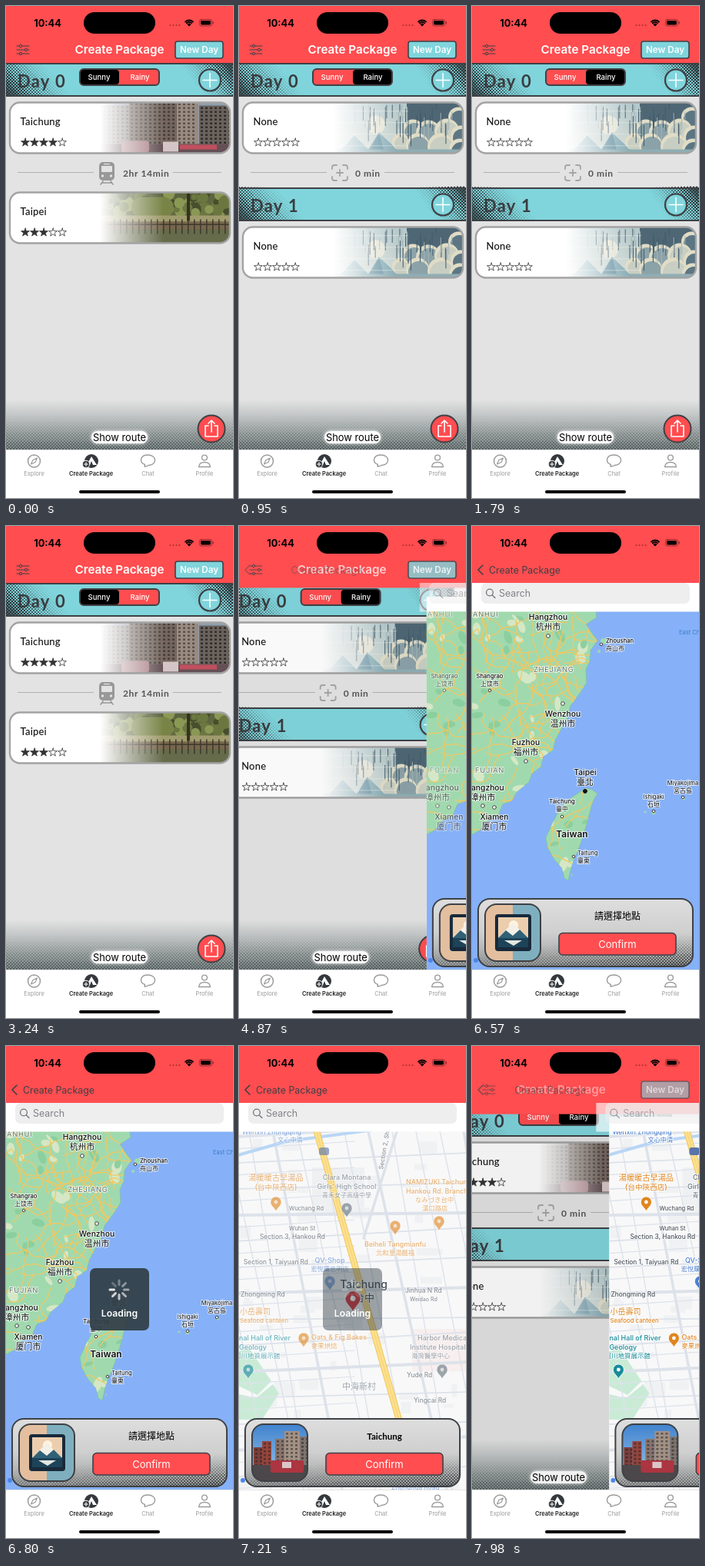
An HTML page with a canvas that plays this animation: 295 by 640 pixels, repeating every 8 s.

```html
<!DOCTYPE html>
<html lang="en">
<head>
<meta charset="utf-8">
<title>Trip planner</title>
<style>
html, body { margin: 0; width: 100%; height: 100%; overflow: hidden; background: #fff; }
canvas { display: block; width: 295px; height: 640px; }
</style>
</head>
<body>
<canvas id="stage"></canvas>
<script>
const W = 295, H = 640, LOOP = 8000;
const RED = '#ff4d50', CYAN = '#80d5dc', INK = '#3e4145', GRAY = '#9b9b9b';
const UI = 'Inter, "Noto Sans CJK TC", "Noto Sans CJK SC", sans-serif';
const HAND = 'Lato, sans-serif';
const canvas = document.getElementById('stage'), ctx = canvas.getContext('2d');
const dpr = window.devicePixelRatio || 1;
canvas.width = W * dpr;
canvas.height = H * dpr;

const clamp = v => Math.max(0, Math.min(1, v));
const ramp = (t, from, to) => clamp((t - from) / (to - from));
const ease = v => v * v * (3 - 2 * v);
const spring = ms => ms <= 0 ? 0 : 1 - (1 + 0.015 * ms) * Math.exp(-0.015 * ms);

function random(seed) {
  return () => (seed = (seed * 16807) % 2147483647) / 2147483647;
}
function scoped(fn) { ctx.save(); fn(); ctx.restore(); }
function faded(alpha, fn) {
  if (alpha > 0) scoped(() => { ctx.globalAlpha *= alpha; fn(); });
}
function shifted(x, y, fn) { scoped(() => { ctx.translate(x, y); fn(); }); }
function rect(x, y, w, h, color) { ctx.fillStyle = color; ctx.fillRect(x, y, w, h); }
function paint(fill, stroke, width = 1) {
  if (fill) { ctx.fillStyle = fill; ctx.fill(); }
  if (stroke) { ctx.strokeStyle = stroke; ctx.lineWidth = width; ctx.stroke(); }
}
function box(x, y, w, h, r, fill, stroke, width) {
  ctx.beginPath(); ctx.roundRect(x, y, w, h, r); paint(fill, stroke, width);
}
function disc(x, y, r, fill, stroke, width) {
  ctx.beginPath(); ctx.arc(x, y, r, 0, 7); paint(fill, stroke, width);
}
function shape(points, fill, stroke, width) {
  ctx.beginPath(); points.forEach(p => ctx.lineTo(p[0], p[1])); ctx.closePath();
  paint(fill, stroke, width);
}
function icon(d, color, width = 1.4, fill) {
  const path = new Path2D(d);
  if (fill) { ctx.fillStyle = fill; ctx.fill(path); }
  ctx.strokeStyle = color; ctx.lineWidth = width; ctx.lineCap = ctx.lineJoin = 'round';
  ctx.stroke(path);
}
function vertical(y0, y1, ...colors) {
  const g = ctx.createLinearGradient(0, y0, 0, y1);
  colors.forEach((c, i) => g.addColorStop(i / (colors.length - 1), c));
  return g;
}
function text(s, x, y, size, color = '#000', weight = 400, align = 'left', font = UI) {
  ctx.font = `${weight} ${size}px ${font}`;
  ctx.textAlign = align;
  ctx.fillStyle = color;
  ctx.fillText(s, x, y);
}
function handText(s, x, y, size, color, weight, spacing) {
  scoped(() => {
    ctx.letterSpacing = spacing + 'px';
    text(s, x, y, size, color, weight, 'left', HAND);
  });
}
function label(s, x, y, size, color, weight, align) {
  ctx.font = `${weight} ${size}px ${UI}`;
  ctx.textAlign = align;
  ctx.lineJoin = 'round';
  ctx.lineWidth = 2;
  ctx.strokeStyle = 'rgba(255,255,255,.75)';
  ctx.strokeText(s, x, y);
  text(s, x, y, size, color, weight, align);
}
// Staggered dots whose size follows strength(x, y)
function halftone(x, y, w, h, color, strength) {
  ctx.beginPath();
  for (let row = 0, py = y; py < y + h; py += 2, row++) {
    for (let px = x + (row % 2) * 2; px < x + w; px += 4) {
      const r = clamp(strength(px, py)) * 1.65;
      if (r > 0.25) { ctx.moveTo(px + r, py); ctx.arc(px, py, r, 0, 7); }
    }
  }
  paint(color);
}

// ---- pictures ----
function tower(x, y, w, h, wall, glass) {
  rect(x, y, w, h, wall);
  for (let py = y + 2; py < y + h; py += 5)
    for (let px = x + 2; px < x + w - 2; px += 6) rect(px, py, 3, 2.5, glass);
}
function streetPhoto() {
  rect(110, 0, 185, 70, '#8fa0b0');
  tower(118, 4, 44, 66, '#8d8683', '#625d5c');
  tower(160, 0, 62, 56, '#75665e', '#463f3d');
  tower(222, 0, 28, 60, '#9a8b80', '#5b514b');
  tower(251, 5, 42, 65, '#6b625c', '#302e2e');
  rect(110, 55, 185, 15, '#655055');
  box(150, 51, 36, 15, 4, '#a98288');
  rect(204, 52, 20, 13, '#d6c5c6');
  rect(226, 56, 48, 6, '#c24f5e');
}
function gardenPhoto() {
  rect(110, 0, 185, 70, vertical(0, 66, '#59633c', '#6f7048'));
  const rnd = random(41);
  for (let i = 0; i < 60; i++)
    disc(120 + rnd() * 170, rnd() * 28, 3 + rnd() * 7, ['#454f2d', '#6b7740', '#8b9855'][i % 3]);
  box(163, 7, 55, 27, 14, '#788346');
  rect(110, 31, 185, 8, '#a09b6d');
  rect(110, 39, 185, 10, '#77664d');
  rect(110, 49, 185, 20, '#666b4b');
  for (let x = 140; x < 290; x += 8) rect(x, 36, 1.5, 19, '#3e392d');
  rect(130, 42, 165, 1.5, '#3e392d');
  rect(235, 0, 4, 38, '#35331f');
}
function rainPicture() {
  rect(110, 0, 185, 70, vertical(0, 66, '#b4c8cb', '#d0d9d2'));
  disc(178, 30, 12, '#e4e3d4');
  shape([[125, 70], [150, 44], [168, 62], [182, 40], [214, 70]], '#89adb7');
  shape([[165, 70], [182, 40], [190, 70]], '#6893a3');
  rect(218, 0, 77, 44, '#4f6775');
  [[226, 37, 14], [210, 52, 11], [285, 20, 13], [246, 40, 16], [270, 38, 16], [288, 44, 13], [232, 56, 15], [262, 58, 17], [287, 62, 14]]
    .forEach(([x, y, r], i) => {
      disc(x, y, r, '#e0dcc6');
      disc(x + 1.5, y + 3, r - 1.5, ['#8ba2a8', '#c9cec2', '#5c7683'][i % 3]);
    });
  const rnd = random(9);
  for (let i = 0; i < 46; i++)
    rect(150 + rnd() * 138, rnd() * 30, 1, 8 + rnd() * 20, i % 3 ? '#415b6b' : '#a3b4b5');
  for (let y = 12; y < 60; y += 15) rect(125, y, 95, 0.7, 'rgba(235,238,230,.7)');
  rect(110, 62, 185, 6, '#8faeb4');
}

// ---- itinerary ----
function star(x, y, full) {
  const points = [];
  for (let i = 0; i < 10; i++) {
    const r = i % 2 ? 2.3 : 5.7, a = i * Math.PI / 5 - Math.PI / 2;
    points.push([x + r * Math.cos(a), y + r * Math.sin(a)]);
  }
  shape(points, full ? '#333' : null, '#333', 0.8);
}
function placeCard(y, name, stars, picture) {
  shifted(0, y, () => {
    box(5, 1, 286, 66, 13, '#fff');
    scoped(() => {
      ctx.clip();
      picture();
      const g = ctx.createLinearGradient(122, 0, 205, 0);
      g.addColorStop(0, '#fff');
      g.addColorStop(1, 'rgba(255,255,255,0)');
      rect(5, 0, 290, 70, g);
    });
    box(5, 1, 286, 66, 13, null, '#a3a3a3', 2.4);
    handText(name, 18.5, 30.5, 13, '#111', 500, 0.2);
    for (let i = 0; i < 5; i++) star(25 + 12 * i, 53, i < stars);
  });
}
function dayBand(y, n) {
  rect(0, y, W, 44, CYAN);
  halftone(0, y, W, 44, '#2c3437', (x, py) => {
    const slant = (py - y - 22) / 90;
    return 0.82 * Math.max(1 - x / 82 + slant, 1 - (W - x) / 64 - slant);
  });
  rect(0, y, W, 2, INK);
  rect(0, y + 42, W, 2, INK);
  handText('Day ' + n, 15, y + 32, 22, '#3a3c3f', 700, 1.2);
  disc(265, y + 22.5, 14, CYAN, INK, 2.2);
  icon(`M256 ${y + 22.5}H274M265 ${y + 13.5}V${y + 31.5}`, '#fff', 1.5);
}
function travelRow(duration, x, lineStart, drawIcon) {
  rect(15, 216, 99, 1, '#b0b0b0');
  rect(lineStart, 216, 280 - lineStart, 1, '#b0b0b0');
  drawIcon();
  handText(duration, x, 222, 12, '#555', 700, 0.6);
}
function trainIcon() {
  box(121, 203, 20, 24, 5, '#989898');
  box(124, 208, 14, 8, 1, '#e3e3e3');
  rect(127, 205, 8, 1.2, '#e3e3e3');
  disc(125.5, 221, 1.7, '#e3e3e3');
  disc(136.5, 221, 1.7, '#e3e3e3');
  icon('M126 228L123 232M136 228L139 232M125 230H137', '#989898', 1.6);
}
function addIcon() {
  icon('M121 212V210Q121 207 124 207H127M135 207H138Q141 207 141 210V212M141 222V224Q141 227 138 227H135M127 227H124Q121 227 121 224V222M127 217H135M131 213V221', '#a5a5a5', 1.8);
}
function segment(rainy) {
  box(96, 82, 103, 21, 5, RED, INK, 2);
  box(97 + 51 * rainy, 83, 50, 19, 4, '#000');
  text('Sunny', 121, 96, 9.6, '#fff', 500, 'center');
  text('Rainy', 174, 96, 9.6, '#fff', 500, 'center');
}
function itinerary(rainy, filled) {
  rect(0, 74, W, 503, '#e3e3e3');
  dayBand(74, 0);
  faded(1 - rainy, () => {
    placeCard(124.5, 'Taichung', 4, streetPhoto);
    travelRow('2hr 14min', 152, 217, trainIcon);
    placeCard(241.5, 'Taipei', 3, gardenPhoto);
  });
  faded(rainy, () => {
    placeCard(124.5, filled ? 'Taichung' : 'None', filled ? 4 : 0, filled ? streetPhoto : rainPicture);
    travelRow('0 min', 151, 189, addIcon);
    dayBand(236, 1);
    placeCard(286.5, 'None', 0, rainPicture);
  });
  segment(rainy);
  rect(0, 512, W, 65, vertical(512, 577, 'rgba(110,122,122,0)', 'rgba(110,122,122,.85)'));
  halftone(0, 522, W, 55, 'rgba(60,68,68,.8)', (x, y) => (y - 520) / 90);
  scoped(() => {
    ctx.shadowColor = '#fff';
    ctx.shadowBlur = 4;
    box(111, 553, 73, 16, 8, '#fff');
  });
  text('Show route', 147.5, 565.5, 12.9, '#000', 400, 'center');
  disc(267, 550, 17.5, RED, INK, 2);
  icon('M263 546H259V560H275V546H271M267 554V539M263 543L267 539L271 543', '#fff', 1.6);
}

// ---- maps ----
const mainland = [[-5, 105], [160, 105], [162, 119], [148, 128], [163, 149], [154, 162], [153, 176], [148, 187], [149, 204],
  [139, 219], [128, 234], [124, 250], [116, 264], [108, 279], [105, 292], [92, 300], [90, 313], [78, 322], [74, 333], [59, 345],
  [52, 357], [40, 362], [34, 376], [19, 385], [10, 396], [-5, 404]];
const island = [[137, 348], [148, 341], [156, 343], [163, 348], [157, 358], [153, 373], [147, 395], [140, 416], [130, 440],
  [125, 461], [120, 458], [117, 445], [107, 434], [98, 418], [96, 405], [103, 390], [112, 372], [122, 358]];
const roads = new Path2D();
const rnd = random(77);
for (let i = 0; i < 95; i++) {
  let x = rnd() * 170, y = 105 + rnd() * (i < 80 ? 290 : 350), a = rnd() * 6.3;
  roads.moveTo(x, y);
  for (let k = 0; k < 14; k++) {
    a += (rnd() - 0.5) * 1.1;
    roads.lineTo(x += 5 * Math.cos(a), y += 5 * Math.sin(a));
  }
}
// name, local name, x, first baseline, size, weight, align, dot x, dot y
const towns = [
  ['Hangzhou', '杭州市', 99, 122, 10.3, 500, 'center', 99, 143], ['Zhoushan', '舟山市', 174, 152, 7.6, 500, 'left', 168, 154],
  ['Shangrao', '上饶市', 23, 198, 7.6, 500, 'center', 23, 214], ['Wenzhou', '温州市', 118, 248, 10.3, 500, 'center', 118, 231],
  ['Fuzhou', '福州市', 70, 285, 10.3, 500, 'center', 70, 306], ['Zhangzhou', '漳州市', 14, 344, 10.3, 500, 'center', 14, 364],
  ['Xiamen', '厦门市', 29, 382, 10.3, 500, 'center', 29, 366], ['Taipei', '臺北', 147, 324, 10.3, 500, 'center', 147, 345],
  ['Taichung', '臺中', 117, 361, 7.6, 500, 'center', 117, 378], ['Taitung', '臺東', 137, 428, 7.6, 400, 'left', 132, 430],
  ['Ishigaki', '石垣', 236, 355, 7.6, 400, 'center', 236, 371], ['Miyakojima', '宮古島', 274, 337, 7.6, 400, 'center', 274, 353]];

function overview(labels) {
  rect(0, 111, W, 466, '#86b1f8');
  [mainland, island].forEach(points => scoped(() => {
    shape(points, '#a1d9ae', '#79c3a0', 0.8);
    ctx.clip();
    const r = random(23);
    for (let i = 0; i < 60; i++) {
      ctx.beginPath();
      ctx.ellipse(r() * 170, 105 + r() * 350, 3 + r() * 8, 2 + r() * 5, r() * 3, 0, 7);
      paint(i % 3 ? '#d5e7c4' : '#8ccf9f');
    }
    ctx.strokeStyle = '#f3c75f';
    ctx.lineWidth = 1.2;
    ctx.stroke(roads);
  }));
  [[171, 150, 4], [165, 163, 2], [236, 373, 2.4], [225, 372, 1.5], [275, 355, 1.8], [130, 454, 1]].forEach(([x, y, r]) => disc(x, y, r, '#a1d9ae'));
  faded(labels, () => {
    text('East Ch', 269, 141, 7.5, '#3f78c8');
    ctx.letterSpacing = '0.7px';
    [['ANHUI', 1, 118], ['ZHEJIANG', 80, 190], ['FUJIAN', 4, 321]].forEach(([s, x, y]) => label(s, x, y, 9.4, '#66736b', 400, 'left'));
    ctx.letterSpacing = '0px';
    towns.forEach(([name, local, x, y, size, weight, align, dx, dy]) => {
      disc(dx, dy, size > 9 ? 2.3 : 1.8, '#fff', '#333', 0.9);
      label(name, x, y, size, '#111', weight, align);
      label(local, x, y + size * 1.25, size * 1.05, '#111', weight, align);
    });
    disc(147, 345, 2.4, '#111', '#111', 1);
    label('Taiwan', 130, 405, 12, '#111', 600, 'center');
  });
}

function pin(x, y, color, scale = 1) {
  shifted(x, y, () => {
    ctx.scale(scale, scale);
    icon('M0 11C-2 6 -7 4 -7 -1A7 7 0 0 1 7 -1C7 4 2 6 0 11Z', '#fff', 0.8, color);
    disc(0, -1, 2.4, '#fff');
  });
}
function road(x0, y0, x1, y1, width, color = '#dde2ea') {
  ctx.beginPath(); ctx.moveTo(x0, y0); ctx.lineTo(x1, y1); paint(null, color, width);
}
const FOOD = '#df851e', SLATE = '#66747f', TEAL = '#168b98', BLUE = '#4c7fce', STREET = '#4f565e';
// text, x, baseline, size, colour, align
const places = [
  ['Wenxin Zhongqing', 4, 115, 8.6, BLUE, 'left'], ['文心中清', 50, 125, 8.2, BLUE, 'left'],
  ['湯暖暖古早湯品', 48, 175, 10.2, FOOD, 'center'], ['(台中陝西店)', 48, 187, 9.6, FOOD, 'center'],
  ['Clara Montana', 140, 174, 9, SLATE, 'center'], ["Girls' High School", 140, 186, 9, SLATE, 'center'], ['青禾女子高級中學', 140, 197, 8, SLATE, 'center'],
  ['NAMIZUKI Taichung', 217, 180, 8.8, FOOD, 'left'], ['Hankou Rd. Branch', 217, 192, 8.8, FOOD, 'left'], ['なみづき台中', 229, 203, 8.4, FOOD, 'left'], ['漢口路店', 238, 214, 8.4, FOOD, 'left'],
  ['Beiheli Tangmianfu', 203, 261, 8.8, FOOD, 'center'], ['北和里湯麵福', 203, 272, 8.4, FOOD, 'center'],
  ['QV-Shop', 118, 282, 9, BLUE, 'center'], ['宏悅購忠明店', 118, 293, 8.2, BLUE, 'center'],
  ['小岳壽司', 1, 349, 10, FOOD, 'left'], ['Seafood canteen', 1, 360, 7.8, FOOD, 'left'],
  ['Oats & Fig Bakes', 94, 382, 9, FOOD, 'left'], ['麥果烘焙', 94, 393, 8.4, FOOD, 'left'],
  ['nal Hall of River', 0, 383, 9, TEAL, 'left'], ['Geology', 0, 395, 9, TEAL, 'left'], ['河川地質展示館', -6, 406, 8.5, TEAL, 'left'],
  ['Harbor Medical', 232, 383, 9, SLATE, 'left'], ['Institute Hospital', 222, 395, 9, SLATE, 'left'], ['海灣醫學中心', 224, 406, 8.4, SLATE, 'left'],
  ['Wuchang Rd', 65, 214, 7.4, STREET, 'left'], ['Wuhan St', 65, 240, 7.4, STREET, 'left'], ['Section 3, Hankou Rd', 27, 251, 8.3, STREET, 'left'],
  ['Section 1, Taiyuan Rd', 6, 284, 8.3, STREET, 'left'], ['Zhongming Rd', 2, 326, 8.3, STREET, 'left'], ['Jinhua N Rd', 216, 321, 8.3, STREET, 'left'],
  ['Weidao Rd', 222, 332, 7, STREET, 'left'], ['Yude Rd', 218, 431, 8.3, STREET, 'left'], ['Yingcai Rd', 227, 464, 8.3, STREET, 'left'],
  ['中海新村', 156, 447, 11, SLATE, 'center'], ['Zhonghua Road', 198, 577, 8.3, BLUE, 'left']];

function city(labels) {
  rect(0, 111, W, 466, '#f8f8f9');
  const r = random(15);
  for (let i = 0; i < 50; i++) rect(r() * W, 112 + r() * 460, 6 + r() * 22, 4 + r() * 14, '#f0f1f3');
  rect(95, 158, 68, 60, '#eef0f2');
  rect(225, 368, 75, 55, '#f7eeee');
  shape([[-5, 398], [14, 394], [42, 436], [24, 454], [-5, 440]], '#c9ebd6');
  shape([[-5, 452], [22, 458], [44, 440], [52, 452], [30, 486], [-5, 486]], '#c9ebd6');
  for (let i = 0; i < 15; i++) {
    const y = 118 + i * 34;
    road(-5, y, 300, y - 18 + (i % 4) * 5, i % 3 ? 1.8 : 4);
    road(-5, y + 16, 150, y + 6, 1.2);
  }
  for (let i = 0; i < 13; i++) {
    const x = -80 + i * 31;
    road(x, 111, x + 78 + (i % 3) * 12, 577, i % 4 ? 1.4 : 3.5);
  }
  road(205, 111, 162, 250, 3.5);
  road(-5, 143, 62, 124, 4, '#b9d6f5');
  road(62, 124, 175, 109, 4, '#b9d6f5');
  [['#eec65d', 8.5], ['#fde08d', 6.5], ['#f3cf6e', 0.8]].forEach(([color, width]) => road(100, 108, 209, 490, width, color));
  faded(labels, () => {
    places.forEach(([s, x, y, size, color, align]) => label(s, x, y, size, color, 500, align));
    shifted(187, 161, () => {
      ctx.rotate(-1.4);
      label('Section 2, Sh', 0, 0, 8, STREET, 500, 'left');
    });
    [[48, 204, FOOD], [203, 235, FOOD], [260, 229, FOOD], [84, 381, FOOD], [140, 212, SLATE], [118, 307, BLUE], [12, 422, TEAL], [264, 422, SLATE]]
      .forEach(([x, y, color]) => pin(x, y, color));
    box(104, 132, 13, 10, 3, '#5874aa');
  });
  label('Taichung', 162, 315, 14, '#444b52', 500, 'center');
  label('台中', 163, 332, 13, '#444b52', 500, 'center');
  pin(148, 330, '#dc3038', 1.45);
}

function thumbnail(chosen) {
  box(17, 492, 72, 74, 15, '#e3bf9f');
  scoped(() => {
    ctx.clip();
    if (chosen) {
      rect(16, 491, 74, 76, vertical(491, 550, '#3f82cf', '#8db8e2'));
      tower(19, 522, 11, 36, '#7c3f3b', '#4b2d2d');
      tower(30, 514, 12, 44, '#94453c', '#57322f');
      tower(47, 511, 12, 46, '#8a746b', '#514a49');
      tower(59, 501, 20, 56, '#a39184', '#5c5653');
      tower(79, 508, 11, 50, '#7f736c', '#464343');
      rect(16, 545, 74, 23, '#4c474a');
      box(41, 539, 43, 16, 2, '#ab3540');
      rect(56, 541, 12, 8, '#dcc4c6');
    } else {
      rect(53, 491, 38, 77, '#7fafbf');
      box(30, 505, 47, 48, 4, '#182a3b');
      rect(34, 509, 39, 26, '#ecceae');
      disc(54, 519, 6, '#fff4df');
      shape([[34, 536], [53, 516], [73, 536]], '#f3f0e8');
      shape([[34, 536], [44, 526], [53, 533], [62, 525], [73, 536]], '#316176');
      rect(34, 536, 39, 12, '#1d4359');
      shape([[42, 539], [65, 539], [54, 546]], '#e5e6df');
    }
  });
  box(17, 492, 72, 74, 15, null, INK, 2);
}
function bottomCard(chosen) {
  disc(5, 565, 3, '#4c86ec');
  box(8, 485, 279, 88, 15, vertical(485, 573, '#dedede', '#cfcfcf', '#9a9c9c'));
  scoped(() => {
    ctx.clip();
    halftone(8, 530, 279, 43, '#3c4142', (x, y) => (y - 533) / 62 + (x - 150) / 900);
  });
  box(8, 485, 279, 88, 15, null, INK, 2);
  thumbnail(chosen);
  if (chosen) text('Taichung', 189, 512, 11.5, '#000', 700, 'center', HAND);
  else text('請選擇地點', 189, 511.5, 12, '#000', 500, 'center');
  box(113, 529.5, 152, 28.5, 5, RED, INK, 1.6);
  text('Confirm', 189, 548.5, 13, '#fff', 400, 'center');
}

// ---- chrome ----
function searchBar() {
  rect(0, 74, W, 37.5, '#fff');
  box(12, 74, 271, 27, 7, '#eeeeef');
  disc(23, 86.5, 4.4, null, '#74747a', 1.3);
  icon('M26.4 90L30 93.5', '#74747a', 1.4);
  text('Search', 35, 92, 12.4, '#808086');
}
function statusBar() {
  text('10:44', 54, 26.5, 12.8, '#000', 700, 'center');
  box(101, 8, 93, 28, 14, '#000');
  for (let i = 0; i < 4; i++) disc(213.5 + i * 4, 25, 1, 'rgba(70,0,0,.45)');
  [7, 4.5, 2].forEach(r => {
    ctx.beginPath(); ctx.arc(238, 25.5, r, -2.35, -0.79); paint(null, '#000', 1.9);
  });
  disc(238, 25, 1.2, '#000');
  box(251.5, 17.5, 16, 8.5, 2.5, null, 'rgba(0,0,0,.4)', 1);
  box(253, 19, 13, 5.5, 1.4, '#000');
  rect(268.6, 20, 1.2, 3.5, 'rgba(0,0,0,.45)');
}
function navBar(p) {
  rect(0, 0, W, 74, RED);
  statusBar();
  faded(1 - p, () => {
    icon('M14 52H30M14 57H30M14 62H30', INK, 1.1);
    [[19, 52], [26, 57], [19, 62]].forEach(([x, y]) => disc(x, y, 1.7, RED, INK, 1));
    box(220, 46, 62, 22, 3, CYAN, INK, 1.6);
    text('New Day', 251, 61.2, 11.7, '#fff', 600, 'center');
    faded(1 - 0.7 * p, () => text('Create Package', 147.5 - 80 * p, 62, 15.2, '#fff', 600, 'center'));
  });
  faded(Math.sqrt(p), () => {
    icon('M14 51L8 57L14 63', INK, 1.6);
    text('Create Package', 22 + 55 * (1 - p), 61.5, 12.4, INK);
  });
}
function tabBar() {
  rect(0, 577, W, 63, '#fff');
  rect(0, 577, W, 0.6, '#d6d6d6');
  disc(36.5, 592, 8, null, GRAY, 1.5);
  shape([[40.5, 588], [38, 593.5], [32.5, 596], [35, 590.5]], null, GRAY, 1.2);
  disc(111, 592, 9, '#34383c');
  shape([[105, 597], [111, 586], [118, 597], [113, 597], [111, 592], [109, 597]], '#fff');
  disc(104, 596, 4.8, '#34383c', '#fff', 1);
  icon('M101.5 596H106.5M104 593.5V598.5', '#fff', 1.1);
  icon('M180 599L180.5 596.5C172 593 175 584 184.5 584C196 584 197 597 185 597.5Q183 599 180 599Z', GRAY, 1.4);
  disc(258, 587.5, 3.4, null, GRAY, 1.4);
  icon('M250.5 599.5Q251 593.5 258 593.5Q265 593.5 265.5 599.5Z', GRAY, 1.4);
  [['Explore', 36.5], ['Create Package', 110.5], ['Chat', 184.5], ['Profile', 258]].forEach(([s, x], i) =>
    text(s, x, 611, 7.5, i === 1 ? '#222' : GRAY, i === 1 ? 600 : 400, 'center'));
  box(95, 630, 105, 4, 2, '#000');
}
function loading(alpha, t) {
  faded(alpha, () => {
    box(109, 289, 77, 81, 7, 'rgba(48,61,70,.92)');
    const head = Math.floor(t / 110);
    for (let i = 0; i < 8; i++) {
      const a = i * Math.PI / 4, c = Math.cos(a), s = Math.sin(a);
      faded(0.3 + 0.7 * ((i - head % 8 + 8) % 8) / 7, () =>
        icon(`M${147 + 6.5 * c} ${317 + 6.5 * s}L${147 + 12 * c} ${317 + 12 * s}`, '#e3e6e8', 3));
    }
  });
  faded(clamp(alpha * 2), () => text('Loading', 147.5, 351.5, 12.2, '#fff', 600, 'center'));
}

// ---- timeline ----
// The screen refreshes in short steps: [start, interval]
const steps = [[0, 500], [500, 112], [2490, 108], [3240, 110], [4870, 113], [6570, 106], [7860, 119]];
function snap(time) {
  const [start, gap] = steps.filter(s => s[0] <= time).pop();
  return start + Math.floor((time - start) / gap) * gap;
}
function draw(time) {
  const t = snap(time);
  const rainy = ease(ramp(t, 440, 840)) - ease(ramp(t, 2430, 2880)) + ease(ramp(t, 3290, 3620));
  const p = t < 7843 ? spring(t - 4820) : 1 - spring(t - 7843);
  const chosen = t >= 6940;

  ctx.setTransform(dpr, 0, 0, dpr, 0, 0);
  ctx.clearRect(0, 0, W, H);
  if (p < 0.9995) {
    shifted(-88.5 * p, 0, () => itinerary(rainy, t > 7400));
    faded(0.14 * p, () => rect(0, 74, W, 503, '#000'));
    rect(0, 74, W, 37 * p, RED);
  }
  if (p > 0) {
    shifted(W * (1 - p), 0, () => {
      rect(0, 92, W, 485, '#fff');
      scoped(() => {
        ctx.beginPath(); ctx.rect(0, 111, W, 466); ctx.clip();
        if (chosen) city(0.35 + 0.65 * ramp(t, 7050, 7420)); else overview(0.6 + 0.4 * ramp(t, 5210, 5430));
        bottomCard(chosen);
      });
    });
    shifted(W * Math.pow(1 - p, 1.2), 0, () => faded(0.4 + 0.6 * p, searchBar));
  }
  navBar(p);
  tabBar();
  loading(t < 6000 ? ramp(t, 4940, 5190) * (1 - ramp(t, 5580, 5740)) : ramp(t, 6590, 6680) * (1 - ramp(t, 7115, 7300)), t);
}
function tick(now) {
  draw(now % LOOP);
  requestAnimationFrame(tick);
}
draw(0);
requestAnimationFrame(tick);
</script>
</body>
</html>
```
